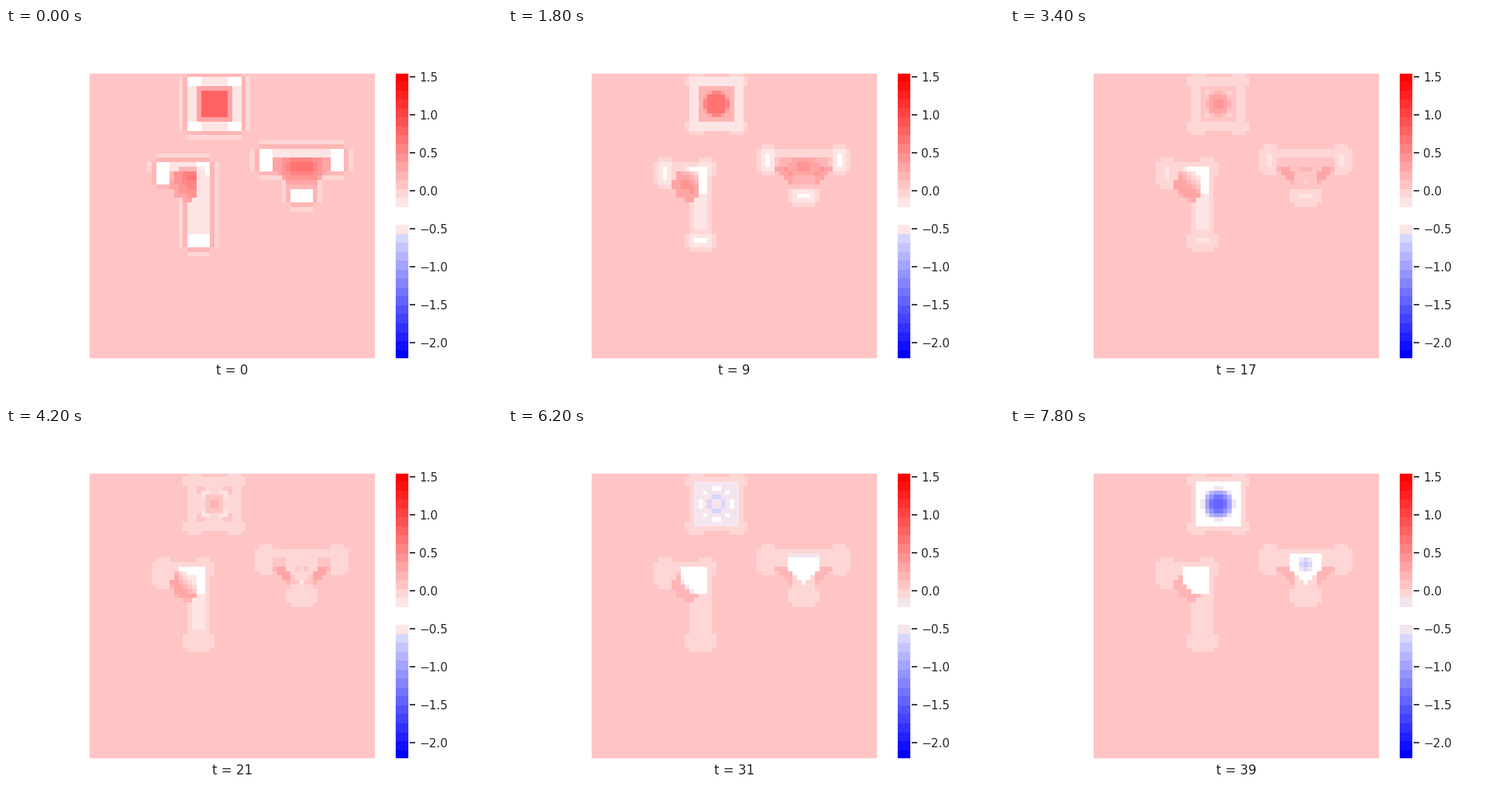
Recreate the animation shown at these times as a matplotlib script. Size 640 px wide and 480 px high, loop 8000 ms.

```python
import numpy as np
import matplotlib.pyplot as plt
from matplotlib.animation import FuncAnimation
from matplotlib.colors import ListedColormap

N, LEVELS, BASE, LAST = 64, 32, 19, 39
VMIN, VMAX = -2.213, 1.558
INK = "#262626"

row, col = np.indices((N, N))


def box(c0, c1, r0, r1):
    return (col >= c0) & (col <= c1) & (row >= r0) & (row <= r1)


def spread(mask, n):
    out = mask.copy()
    for axis in (0, 1):
        for step in (-n, n):
            out |= np.roll(mask, step, axis)
    return out


# The three shapes and the fringe around them.
square = box(22, 33, 1, 12)
head, stem = box(15, 26, 20, 21), box(22, 26, 20, 38)
tee = box(38, 56, 17, 21) | box(45, 49, 22, 28)
solid = square | head | stem | tee
near = spread(solid, 1) & ~solid
far = spread(solid, 2) & ~solid & ~near
far[-1] = False

# Pale tips: square corners, ends and foot of the tee, ends of the hook.
TIPS = [(c, c + 2, r, r + 1) for c in (22, 31) for r in (1, 11)]
TIPS += [(c, c + 2, 17, 21) for c in (38, 54)]
TIPS += [(45, 49, 26, 28), (15, 17, 20, 24), (24, 26, 20, 22), (22, 26, 36, 38)]
tip = np.any([box(*b) for b in TIPS], axis=0)
spot = np.any([box(a + 1, b - 1, c + 1, d - 1) for a, b, c, d in TIPS], axis=0)
halo = np.any([spread(box(*b), 1) for b in TIPS], axis=0)
vein = box(23, 25, 25, 34)


def square_core():
    x, y = abs(col - 27.5), abs(row - 6.5)
    m = np.maximum(x, y)
    start = np.where(m < 3, 25, 21)
    end = np.minimum(16, 5.5 + 0.7 * ((x - 0.0) ** 2 + y ** 2))
    power = np.where(m < 3, 2.3 - 0.14 * (m ** 2 + x * y), 1.2)
    return m < 4, start, end, power, 0


def hook_core():
    d = col - row + 4
    wedge = box(20, 25, 21, 26) & (d >= 0)
    disc = np.hypot(col - 21.5, row - 24.5) <= 3.8
    start = 24 - 0.6 * np.hypot(col - 22.7, row - 23)
    start[row == 21] = 20
    start[col > 23] = 17
    end = np.where(wedge, 14, 20)
    end[~wedge & (d > 0)] = 18
    power = np.where(wedge, 2 * np.exp(-0.35 * np.maximum(d, 0)), 1)
    return wedge | (disc & (col < 24) & (row > 21)), start, end, power, 16


def tee_core():
    k = abs(col - 47)
    mask = (row > 18) & (row < 26) & (k <= np.minimum(6, 27 - row))
    white = (k <= np.minimum(3, 24 - row))
    lobe = (row > 20) & (k > 2)
    q = k ** 2 + (row - 20) ** 2
    start = 25 - 0.7 * np.hypot(k, 1.5 * (row - 20.5))
    end = np.where(lobe, 20, 17.7)
    end[white] = np.minimum(14, 12 + 1.2 * q)[white]
    power = np.where(white | lobe, 1, 0.6)
    return mask, start, end, power, np.where(q > 2, 16, 0)


CORES = [square_core(), hook_core(), tee_core()]
collar = box(23, 32, 2, 11) | box(44, 50, 18, 18)


def field(t):
    def ramp(a, b, span):
        return a + (b - a) * min(t / span, 1)

    s = t / LAST
    u = np.full((N, N), float(BASE))
    u[far] = ramp(18, BASE, 9)
    u[near] = ramp(20, BASE, 9)
    u[halo] = ramp(20, 18, 9)
    u[solid] = ramp(17, 18, 9)
    u[square] = ramp(17, 18, 20)
    u[vein] = ramp(16.5, 17.9, LAST)
    u[tip] = ramp(16, 18, 21)
    u[spot] = ramp(15.2, 18, 21)
    u[collar] = np.minimum(u[collar], 18 - 2 * s ** 3)
    for mask, start, end, power, low in CORES:
        v = np.maximum(start + (end - start) * s ** power, low)
        u[mask] = v[mask]
    return np.floor(u + 0.5)


def palette(t):
    colors = plt.get_cmap("bwr", LEVELS)(np.arange(LEVELS))
    colors[15:17] = 1
    # The two tints beside white share one colour that cools with time.
    cool = np.interp(t, [21, 27, LAST], [0, 0.6, 1])
    tint = np.array([254, 229, 229]) + cool * np.array([-12, 0, 11])
    colors[[14, 17], :3] = tint / 255
    return ListedColormap(colors)


plt.rcParams.update({
    "font.family": "DejaVu Sans",
    "axes.edgecolor": "white",
    "axes.linewidth": 1.25,
    "axes.labelsize": 12,
    "axes.labelcolor": INK,
})
fig = plt.figure(figsize=(6.4, 4.8), dpi=100, facecolor="white")


def panel(left, width):
    return fig.add_axes([left / 640, 0.11, width / 640, 0.77])


ax = panel(107.2, 369.6)
cax = panel(501.6, 18.48)
style = dict(vmin=-0.5, vmax=LEVELS - 0.5, cmap=palette(0))
edges = np.arange(N + 1)
mesh = ax.pcolormesh(edges, edges, field(0), **style)
ax.set(xlim=(0, N), ylim=(N, 0), xticks=[], yticks=[])
label = ax.set_xlabel("t = 0")

bar = cax.pcolormesh([0, 1], np.linspace(VMIN, VMAX, LEVELS + 1),
                     np.arange(LEVELS)[:, None], **style)
cax.set(xlim=(0, 1), ylim=(VMIN, VMAX), xticks=[],
        yticks=np.arange(-2, 1.6, 0.5))
cax.yaxis.tick_right()
cax.tick_params(axis="y", length=6, width=1.25, color=INK,
                labelcolor=INK, labelsize=11)


def update(t):
    cmap = palette(t)
    mesh.set_cmap(cmap)
    bar.set_cmap(cmap)
    mesh.set_array(field(t))
    label.set_text(f"t = {t}")
    return mesh, bar, label


anim = FuncAnimation(fig, update, frames=LAST + 1, interval=200,
                     repeat=True, repeat_delay=0, blit=False)
plt.show()
```
